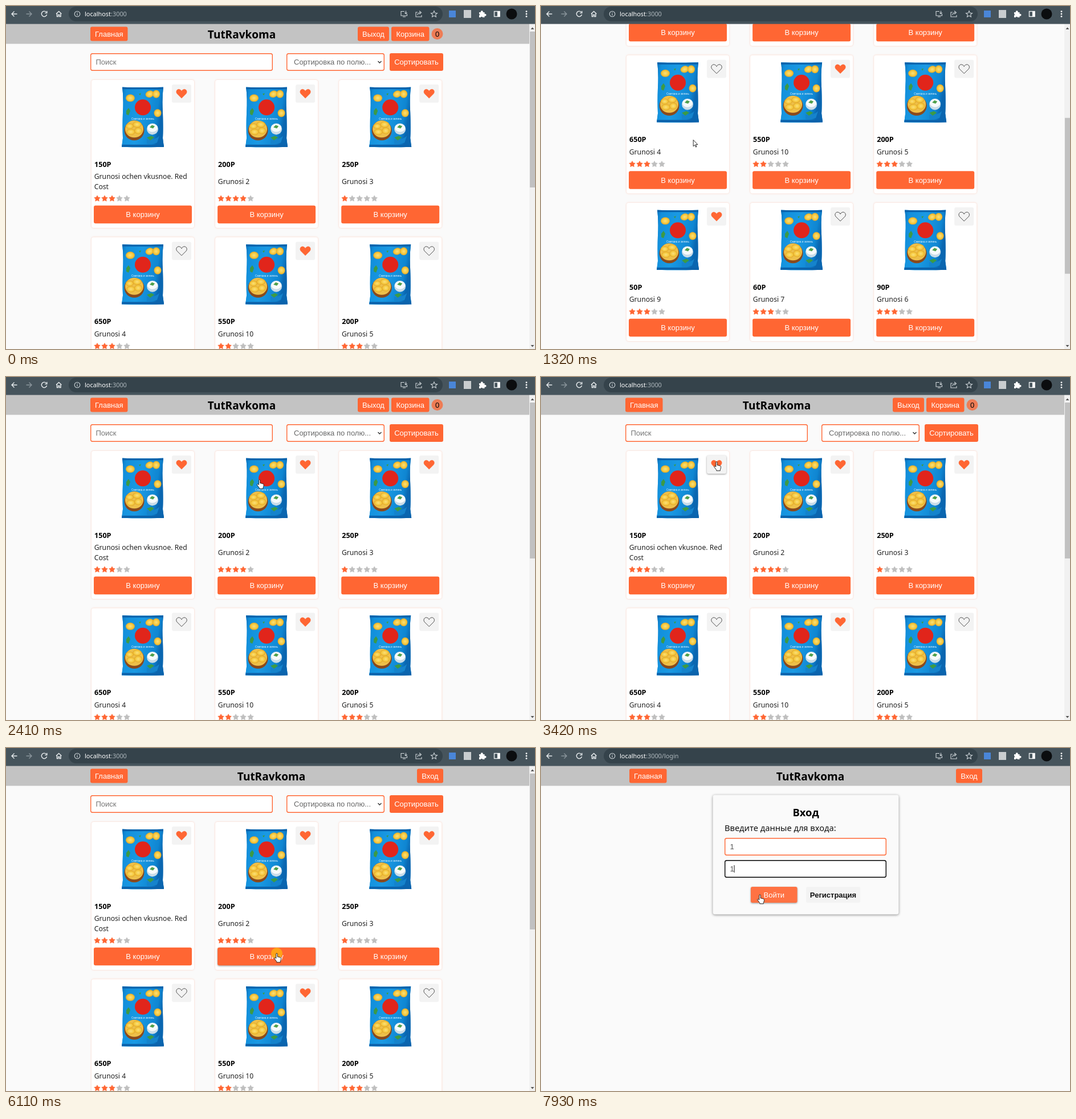
Animation, 928 px wide and 603 px high, one loop 8 s. Source, as an HTML page:

```html
<!DOCTYPE html>
<html lang="ru">
<head>
<meta charset="utf-8">
<title>Shop demo</title>
<style>
html, body { margin: 0; width: 100%; height: 100%; overflow: hidden; background: #fafafa; }
svg { display: block; }
text { font-family: "Liberation Sans", Arial, sans-serif; font-size: 13px; white-space: pre; }
.ui { font-family: "Noto Sans", "Open Sans", sans-serif; }
.b { font-weight: 700; }
.mid { text-anchor: middle; }
.card { filter: drop-shadow(0 0 1.5px rgba(255, 102, 51, .3)); }
.box { filter: drop-shadow(0 1px 2px rgba(0, 0, 0, .45)); }
.menu { filter: drop-shadow(0 1px 2px rgba(0, 0, 0, .3)); }
.hov { filter: drop-shadow(0 1px 1.5px rgba(0, 0, 0, .4)); }
#login .hov rect { fill: #ff7243; }
.ico { fill: none; stroke: #e9edef; stroke-width: 1.4; }
</style>
</head>
<body>
<svg id="stage" width="928" height="603" viewBox="0 0 928 603">
  <defs>
    <linearGradient id="foil" x2="1" y2=".25">
      <stop offset="0" stop-color="#0a72bd"/><stop offset=".12" stop-color="#128fdb"/>
      <stop offset=".5" stop-color="#1a9ae4"/><stop offset=".88" stop-color="#0f86d2"/>
      <stop offset="1" stop-color="#0a66b0"/>
    </linearGradient>
    <linearGradient id="shade" x2="0" y2="1">
      <stop offset=".5" stop-color="#0a5ea6" stop-opacity="0"/><stop offset="1" stop-color="#0a5ea6" stop-opacity=".6"/>
    </linearGradient>
    <radialGradient id="chip">
      <stop offset="0" stop-color="#fbe07a"/><stop offset=".7" stop-color="#f4c73c"/><stop offset="1" stop-color="#dfa32a"/>
    </radialGradient>
    <g id="bag">
      <path id="foilShape" d="M1 .5Q37 1.5 73 .5Q70.5 20 72 45Q73 75 72 90L74 105.5Q37 106.5 0 105.5L2 90Q1 70 2 45Q3.5 20 1 .5Z" fill="url(#foil)"/>
      <use href="#foilShape" style="fill:url(#shade)"/>
      <path d="M1 .5Q37 1.5 73 .5L72.6 4H1.4ZM.6 101.5H73.4L74 105.5H0Z" fill="#0b62ab"/>
      <path d="M44 92q14 2 22-6l-4 12q-10 4-18 2Z" fill="#1583cc"/>
      <g fill="url(#chip)">
        <ellipse cx="15" cy="19.5" rx="8" ry="6.5"/><ellipse cx="49" cy="12.5" rx="7.5" ry="6" transform="rotate(-20 49 12.5)"/>
        <ellipse cx="60.5" cy="12.5" rx="6.5" ry="7"/><ellipse cx="63" cy="46" rx="6.5" ry="7"/>
      </g>
      <path d="M8 42l4-5 3 5-3 8-4-2ZM44 89l8-3 5 3-7 5ZM30 12l4-1-2 4Z" fill="#3c9a45"/>
      <circle cx="37" cy="36" r="14" fill="#e1251b"/>
      <text x="37" y="57.5" class="mid" fill="#e6f3fc" style="font-size:4.8px">Сметана и зелень</text>
      <circle cx="22" cy="76.5" r="17.5" fill="#8a4a1c"/>
      <ellipse cx="22" cy="74" rx="16" ry="15" fill="#eec04a"/>
      <g fill="url(#chip)">
        <ellipse cx="14" cy="69" rx="7" ry="5"/><ellipse cx="27" cy="66" rx="8" ry="5.5"/>
        <ellipse cx="16" cy="79" rx="8" ry="5.5"/><ellipse cx="29" cy="77" rx="7" ry="6"/>
      </g>
      <circle cx="54" cy="74" r="10" fill="#c9dce8"/>
      <ellipse cx="54" cy="72" rx="9" ry="7" fill="#f6fafb"/>
      <path d="M49 71l4-4 5 2-3 4Z" fill="#4fa04c"/>
    </g>
    <path id="heart" d="M0 8L-8 0C-11.2-4-7.6-9-3.6-7.6C-1.6-7 0-5.3 0-4.2C0-5.3 1.6-7 3.6-7.6C7.6-9 11.2-4 8 0Z"/>
    <clipPath id="view"><rect y="31" width="928" height="572"/></clipPath>
  </defs>

  <rect width="928" height="603" fill="#fafafa"/>
  <g clip-path="url(#view)">
    <g id="page">
      <rect y="31" width="928" height="35.5" fill="#c3c3c3"/>
      <g id="shop"></g>
      <g id="member"></g>
      <g id="guest"></g>
    </g>
    <g id="login"></g>
    <g id="bar">
      <rect x="918" y="31" width="10" height="572" fill="#f1f1f1"/>
      <rect id="thumb" x="919" y="45" width="9" height="274" fill="#c1c1c1"/>
      <path d="M920.5 41l3-3.5 3 3.5ZM920.5 596l3 3.5 3-3.5Z" fill="#555"/>
    </g>
  </g>

  <rect width="928" height="31.6" fill="#46545c"/>
  <rect x="110" y="1" width="656" height="26" rx="13" fill="#35434b"/>
  <g class="ico">
    <path d="M19.5 14H10M14.5 9.5L10 14l4.5 4.5"/>
    <path d="M35.5 14H45M40.5 9.5L45 14l-4.5 4.5" stroke="#8b969c"/>
    <path d="M70.6 10.8A4.7 4.7 0 1 0 71.6 15M71.8 8.8V12.4H68.2"/>
    <path d="M88 13.7l4.7-4.2 4.7 4.2M89.4 13v5.6h2.2v-3.2h2.2v3.2H96V13"/>
    <g stroke="#cfd6da" stroke-width="1.1">
      <circle cx="125" cy="14" r="4.8"/><path d="M125 11v1.2M125 13.3v3.4"/>
      <path d="M699 9.5h-6v7.5h10.5v-3M696 19h5M701.5 8.5v5M699.3 11.6l2.2 2.2 2.2-2.2"/>
      <path d="M722 11h-3v8h10v-3M722 16q.5-4.5 5-4.5M725 8.7l3.5 2.8-3.5 2.8"/>
      <path d="M751 8.6l1.6 3.6 3.9.4-2.9 2.6.8 3.9-3.4-2-3.4 2 .8-3.9-2.9-2.6 3.9-.4Z"/>
    </g>
    <rect x="856.5" y="9.5" width="9.5" height="9"/>
  </g>
  <rect x="777" y="8" width="12" height="12" fill="#4a86d8"/>
  <rect x="803" y="7" width="13" height="14" fill="#c9cdcf"/>
  <path d="M830 11h3a2 2 0 1 1 3.6 0h2.9v3a2 2 0 1 1 0 3.4v2.6h-3.3a1.8 1.8 0 0 0-3.4 0H830v-3.4a1.8 1.8 0 0 0 0-3.2Z" fill="#fff"/>
  <rect x="862" y="9" width="4.5" height="10" fill="#fff"/>
  <circle cx="887" cy="14" r="9.5" fill="#0b0d0f"/>
  <g fill="#fff"><circle cx="913" cy="9.6" r="1.4"/><circle cx="913" cy="14" r="1.4"/><circle cx="913" cy="18.4" r="1.4"/></g>
  <text x="138" y="18" class="ui" fill="#fff" style="font-size:10.9px">localhost<tspan fill="#aeb7bc">:3000</tspan><tspan id="path" fill="#aeb7bc">/login</tspan></text>

  <circle id="click" r="10" fill="#ffa814" opacity=".9"/>
  <g id="cursor" stroke="#111" stroke-width=".9" stroke-linejoin="round" fill="#fff">
    <path id="arrow" d="M0 0V11.2l2.6-2.4 1.7 3.8 1.6-.7L4.2 8.2h3.6Z"/>
    <path id="hand" d="M-1.2 9V1.2a1.2 1.2 0 0 1 2.4 0V6l1.9.3 1.9.5 1.6.6a1.2 1.2 0 0 1 .9 1.3c0 3-.7 4-1.2 5.5v1.6H-.2v-1.3c-1.2-1.5-2.4-3.2-3.7-5a1.1 1.1 0 0 1 1.7-1.5Z"/>
    <path id="beam" d="M-2.5-6.5q2.5 0 2.5 1.5v10q0 1.5-2.5 1.5M2.5-6.5Q0-6.5 0-5M0 5q0 1.5 2.5 1.5" fill="none"/>
  </g>
</svg>
<script>
const $ = id => document.getElementById(id);
const ORANGE = '#ff6633', GREY = '#f3f3f3';
const hot = [];

function add(parent, tag, attrs = {}, text) {
  const el = document.createElementNS('http://www.w3.org/2000/svg', tag);
  for (const k in attrs) el.setAttribute(k, attrs[k]);
  if (text !== undefined) el.textContent = text;
  return parent.appendChild(el);
}
const rect = (p, x, y, width, height, fill, rx = 3, more = {}) =>
  add(p, 'rect', { x, y, width, height, fill, rx, ...more });
const label = (p, x, y, text, cls = '', size = 13, fill = '#000') =>
  add(p, 'text', { x, y, class: cls, fill, style: `font-size:${size}px` }, text);
const watch = (scene, el, x, y, w, h, kind = 'hand') => hot.push({ scene, el, x, y, w, h, kind });

function button(scene, p, x, y, w, h, text, fill = ORANGE, ink = '#fff', cls = 'mid') {
  const g = add(p, 'g');
  rect(g, x, y, w, h, fill);
  label(g, x + w / 2, y + h / 2 + 4.6, text, cls, 13, ink);
  watch(scene, g, x, y, w, h);
}
function field(scene, p, x, y, w, text) {
  const frame = rect(p, x + .7, y + .7, w - 1.4, 29.6, '#fff', 3, { stroke: ORANGE, 'stroke-width': 1.4 });
  const value = label(p, x + 9.5, y + 19.6, text, '', 13, '#757575');
  watch(scene, null, x, y, w, 31, 'beam');
  return { frame, value };
}

// Header in both states
const TITLE = 'TutRavkoma';
for (const [id, cx] of [['member', 413.5], ['guest', 465.5]]) {
  button(id, $(id), 148, 36.5, 65.5, 25, 'Главная');
  label($(id), cx, 56.5, TITLE, 'ui b mid', 19);
}
button('member', $('member'), 617, 36.5, 55, 25, 'Выход');
button('member', $('member'), 676, 36.5, 66.5, 25, 'Корзина');
add($('member'), 'circle', { cx: 756.5, cy: 49, r: 10, fill: '#ee7c55' });
label($('member'), 756.5, 53.6, '0', 'mid', 13);
button('guest', $('guest'), 721, 36.5, 46, 25, 'Вход');

// Search row
const shop = $('shop');
field('shop', shop, 148, 83, 320, 'Поиск');
rect(shop, 492.7, 83.7, 170.6, 29.6, '#fff', 3, { stroke: ORANGE, 'stroke-width': 1.4 });
label(shop, 505, 102.8, 'Сортировка по полю...', '', 13, '#666');
add(shop, 'path', { d: 'M652.5 97l3 3 3-3', fill: 'none', stroke: '#333', 'stroke-width': 1.4 });
button('shop', shop, 673, 83, 94, 31, 'Сортировать');

// Cards: price, name lines, rating, liked
const star = Array.from({ length: 10 }, (_, i) => {
  const r = i % 2 ? 3 : 5.6, a = Math.PI * (i / 5 - .5);
  return `${(r * Math.cos(a)).toFixed(2)},${(r * Math.sin(a)).toFixed(2)}`;
}).join(' ');
const NAME = 'Grunosi';
const goods = [
  [150, NAME + ' ochen vkusnoe. Red|Cost', 3, 1], [200, NAME + ' 2', 4, 1], [250, NAME + ' 3', 1, 1],
  [650, NAME + ' 4', 3, 0], [550, NAME + ' 10', 2, 1], [200, NAME + ' 5', 3, 0],
  [50, NAME + ' 9', 3, 1], [60, NAME + ' 7', 3, 0], [90, NAME + ' 6', 3, 0]
];
goods.forEach(([price, name, rating, liked], i) => {
  const row = Math.floor(i / 3), x = 150 + 217.1 * (i % 3);
  const y = row ? 406.5 + 259.5 * (row - 1) : 130, extra = row ? 0 : 17;
  rect(shop, x, y, 180, 243 + extra, '#fff', 4, { class: 'card' });
  add(shop, 'use', { href: '#bag', x: x + 53, y: y + 12.3 });
  watch('shop', null, x + 4, y + 4, 172, 122);

  const like = add(shop, 'g');
  rect(like, x + 141, y + 8, 34, 32, GREY);
  add(like, 'use', {
    href: '#heart', x: x + 158, y: y + 24.2, fill: liked ? ORANGE : 'none',
    stroke: liked ? ORANGE : '#3a3a3a', 'stroke-width': liked ? .4 : .9
  });
  watch('shop', like, x + 141, y + 8, 34, 32);

  label(shop, x + 5, y + 152.6, price + 'Р', 'ui b', 12.6);
  const lines = name.split('|');
  const top = y + 174.2 + (extra && lines.length < 2 ? 8.8 : 0);
  lines.forEach((s, n) => label(shop, x + 4.7, top + n * 17.6, s, 'ui', 12.2, '#212121'));
  for (let n = 0; n < 5; n++) add(shop, 'polygon', {
    points: star, fill: n < rating ? ORANGE : '#bfbfbf',
    stroke: n < rating ? ORANGE : '#bfbfbf', 'stroke-width': .5, 'stroke-linejoin': 'round',
    transform: `translate(${x + 10 + 13 * n} ${y + 191.6 + extra})`
  });
  button('shop', shop, x + 4, y + 203.7 + extra, 172, 31.6, 'В корзину');
});

// Login form
const login = $('login');
rect(login, 301.5, 82.5, 326, 210, '#fafafa', 4, { class: 'box' });
label(login, 464.5, 119.7, 'Вход', 'ui b mid', 18.4);
label(login, 322, 146.4, 'Введите данные для входа:', 'ui', 14.6, '#111');
const user = field('login', login, 322, 158, 284, '');
const pass = field('login', login, 322, 197, 284, '');
button('login', login, 368, 244, 81.5, 28, 'Войти');
button('login', login, 465, 244, 95, 28, 'Регистрация', GREY, '#111', 'mid b');
const caret = rect(login, 331, 167, 1, 13, '#111', 0);

function menu(y, items) {
  const g = add(login, 'g', { class: 'menu' });
  rect(g, 404, y, 126, items.length * 28 + 12, '#fff', 4);
  add(g, 'path', { d: `M461 ${y + .5}l6-5 6 5Z`, fill: '#fff' });
  items.forEach((s, i) => label(g, 414, y + 24.5 + 28 * i, s, '', 10, '#333'));
  return g;
}
const saved = ['1', '2', 'morin', '3', 'e', 'sad'];
const userMenu = menu(195, saved), userMatch = menu(195, ['1']), passMenu = menu(234, saved);

// Motion: [time, values...]
const scrollKeys = [[985, 0], [1050, 110], [1120, 249], [1180, 249], [1260, 320],
  [1460, 320], [1660, 194], [1725, 194], [1790, 0]];
const mouseKeys = [
  [180, 770, 95], [450, 560, 330], [700, 300, 560], [800, 165, 540], [980, 255, 260],
  [1120, 265, 229], [1400, 268, 238], [1660, 275, 247], [1730, 275, 247], [2050, 308, 150],
  [2350, 420, 190], [2610, 525, 150], [2800, 525, 152], [3050, 400, 195], [3250, 285, 190],
  [3420, 308, 149], [3550, 309, 150], [3900, 440, 200], [4340, 545, 205], [4400, 552, 197],
  [4599, 552, 197], [4600, 558, 189], [4670, 558, 189], [4900, 620, 110], [5100, 645, 48],
  [5250, 645, 48], [5400, 690, 60], [5800, 560, 230], [6050, 475, 361], [6250, 475, 361],
  [6400, 470, 408], [6750, 420, 260], [6950, 375, 172], [7130, 375, 172], [7400, 385, 190],
  [7540, 385, 212], [7660, 385, 212], [7930, 384, 258]
];
const clicks = [[5130, 5270], [6080, 6185], [6950, 7060], [7540, 7650]];
const LOGOUT = 5230, OPEN = 6185, FOCUS = 6980, TYPE = 7200, NEXT = 7540, TYPE2 = 7730;

function at(keys, t) {
  const i = keys.findIndex(k => k[0] > t);
  if (i < 0) return keys[keys.length - 1].slice(1);
  if (i === 0) return keys[0].slice(1);
  const a = keys[i - 1], b = keys[i], u = (t - a[0]) / (b[0] - a[0]);
  return a.slice(1).map((v, n) => v + (b[n + 1] - v) * u);
}
const show = (el, on) => el.style.display = on ? '' : 'none';
const within = (t, a, b) => t >= a && t < b;

function focus(f, on, typed, hint) {
  f.frame.setAttribute('stroke', on ? '#000' : ORANGE);
  f.value.textContent = typed ? '1' : hint;
  f.value.setAttribute('fill', typed ? '#555' : '#757575');
}

function draw(t) {
  const [scroll] = at(scrollKeys, t), [x, y] = at(mouseKeys, t);
  const onLogin = t >= OPEN, guest = t >= LOGOUT;
  const scenes = onLogin ? ['login'] : ['shop', guest ? 'guest' : 'member'];

  $('page').setAttribute('transform', `translate(0 ${-scroll})`);
  $('thumb').setAttribute('y', 45 + scroll * .474);
  $('guest').setAttribute('transform', `translate(${onLogin ? 7 : 0} 0)`);
  show(shop, !onLogin);
  show($('bar'), !onLogin);
  show(login, onLogin);
  show($('path'), onLogin);
  show($('member'), !guest);
  show($('guest'), guest);

  focus(user, within(t, FOCUS, NEXT), t >= TYPE, 'Логин');
  focus(pass, t >= NEXT, t >= TYPE2, 'Пароль');
  show(userMenu, within(t, FOCUS, TYPE));
  show(userMatch, within(t, TYPE, NEXT));
  show(passMenu, within(t, NEXT, TYPE2));
  show(caret, t >= FOCUS);
  caret.setAttribute('x', within(t, TYPE, NEXT) || t >= TYPE2 ? 338.5 : 331);
  caret.setAttribute('y', t < NEXT ? 167 : 206);

  let kind = 'arrow';
  for (const h of hot) {
    const py = y + scroll;
    const hit = t >= 180 && scenes.includes(h.scene) &&
      x >= h.x && x <= h.x + h.w && py >= h.y && py <= h.y + h.h;
    if (hit) kind = h.kind;
    if (h.el) h.el.classList.toggle('hov', hit);
  }
  for (const k of ['arrow', 'hand', 'beam']) show($(k), k === kind);
  show($('cursor'), t >= 180);
  $('cursor').setAttribute('transform', `translate(${x} ${y})`);
  show($('click'), clicks.some(c => within(t, ...c)));
  $('click').setAttribute('cx', x);
  $('click').setAttribute('cy', y);
}

const start = performance.now();
function tick() {
  draw((performance.now() - start) % 8000);
  requestAnimationFrame(tick);
}
tick();
</script>
</body>
</html>
```
